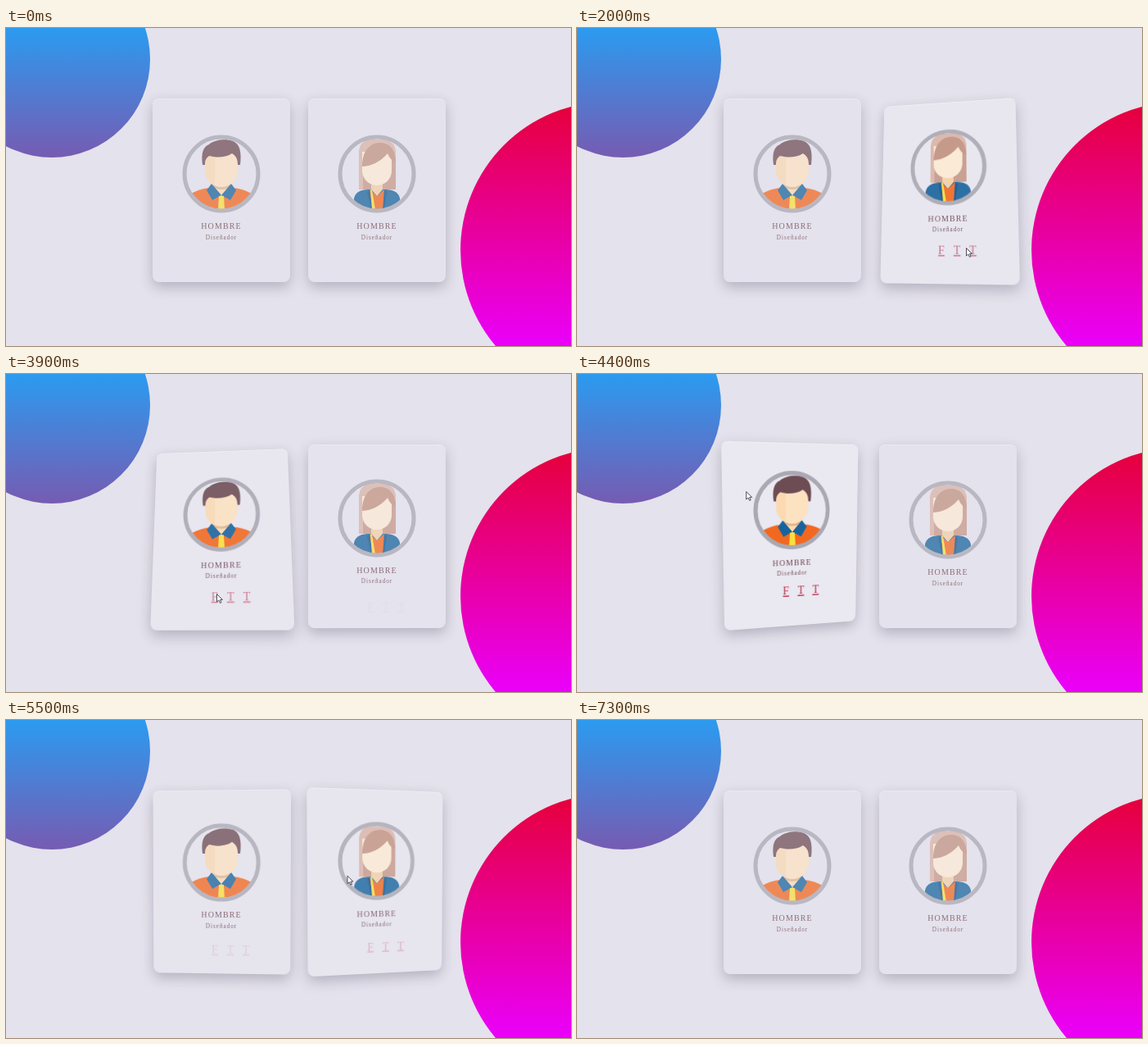
An HTML page that plays this animation: 690 by 388 pixels, repeating every 8.3 s.

```html
<!DOCTYPE html>
<html lang="es">
<head>
<meta charset="utf-8">
<title>Tarjetas</title>
<style>
html, body { margin: 0; width: 100%; height: 100%; overflow: hidden; background: #e4e2ec; }
#stage { position: absolute; left: 0; top: 0; width: 690px; height: 388px; overflow: hidden; background: #e4e2ec; }
.ball { position: absolute; border-radius: 50%; }
.blue { left: -64px; top: -82px; width: 240px; height: 240px; background: linear-gradient(#2b9bf0 82px, #765bb2 240px); }
.pink { left: 555px; top: 90px; width: 362px; height: 362px; background: linear-gradient(#e6003c 6px, #ea00fa 298px); }
.card { position: absolute; top: 86px; width: 168px; height: 224px; border-radius: 8px; background: #e4e2ec;
  box-shadow: 0 6px 16px rgba(55, 50, 75, .28), inset 0 1px 0 rgba(255, 255, 255, .25); }
.card svg, .glare { position: absolute; left: 0; top: 0; width: 168px; height: 224px; }
.card svg { overflow: visible; }
.glare { border-radius: 8px; background: #fff; }
text { font-family: "Liberation Serif", "Times New Roman", serif; text-anchor: middle; }
.name { font-size: 10px; letter-spacing: 1.1px; fill: #6a4450; }
.job { font-size: 7.2px; letter-spacing: 1px; fill: #6a4450; }
.links text { font-size: 14px; fill: #b92b4e; text-decoration: underline; }
#cursor { position: absolute; left: 0; top: 0; width: 10px; height: 14px; overflow: visible; }
</style>
</head>
<body>
<div id="stage">
  <div class="ball blue"></div>
  <div class="ball pink"></div>
</div>
<script>
const LOOP = 8300, STEP = 100;
const CARD = { w: 168, h: 224, top: 86 };
const MAX_TILT = 25, TILT_LAG = 350, HOVER_LAG = 500;
const stage = document.getElementById('stage');

const man = `
  <path d="M-44 44L-37 24Q-26 18-14 17H14Q26 18 37 24L44 44Z" fill="#f2681f"/>
  <path d="M-11 8H11V15L0 28L-11 15Z" fill="#e3b68c"/>
  <path d="M-11 17Q0 21 11 17L0 28Z" fill="#fbdcb4"/>
  <path d="M-12 12L-18 20L-11 32L0 26Z M12 12L18 20L11 32L0 26Z" fill="#17639d"/>
  <path d="M-3 27H3L4 44H-4Z" fill="#fbe03c"/>
  <path d="M-20-27H20V-4C20 8 10 16 0 16C-10 16-20 8-20-4Z" fill="#fde2c2"/>
  <path d="M-20-27H-8V14C-15 11-20 5-20-4Z" fill="#fbdab2"/>
  <path d="M-23-11C-25-26-22-33-15-36C-8-42 6-43 14-40C22-37 25-28 23-11H20C20-18 18-22 13-25C4-19-8-20-15-22C-19-19-20-16-20-11Z" fill="#6d4c54"/>`;

const woman = `
  <path d="M-22 19V-28Q-21-38-12-42H12Q22-38 23-28V19Z" fill="#dab4a8"/>
  <path d="M-17 19V-20H23V19Z" fill="#c79889"/>
  <path d="M-28 44V30Q-26 20-12 19H12Q26 20 28 30V44Z" fill="#17639d"/>
  <path d="M-9 19L0 27L9 19L8 44H-6Z" fill="#f2681f"/>
  <path d="M-7 8H7V19L0 27L-7 19Z" fill="#f3d0a6"/>
  <path d="M-9 19L-12 22L-7 44H-5Z M9 19L12 22L9 44H7Z" fill="#0c528b"/>
  <path d="M-8 19L-6 20L-2 44H-6Z" fill="#fbe03c"/>
  <path d="M-18-27H18V-4C18 7 9 14 0 14C-9 14-18 7-18-4Z" fill="#fdebd4"/>
  <path d="M-18-9C-18-28-9-38 4-38C16-38 23-29 23-14Q16-17 13-25Q0-10-18-9Z" fill="#c2927f"/>`;

function addCard(x, face) {
  const el = document.createElement('div');
  el.className = 'card';
  el.style.left = x + 'px';
  const links = ['F', 'T', 'T'].map((c, i) => `<text x="${76 + 19 * i}" y="184.5">${c}</text>`).join('');
  el.innerHTML = `<div class="glare"></div>
    <svg viewBox="0 0 168 224">
      <clipPath id="round${x}"><circle r="43"/></clipPath>
      <g class="info">
        <g transform="translate(84 92)">
          <g clip-path="url(#round${x})">${face}</g>
          <circle r="45" fill="none" stroke="#a9a8b3" stroke-width="5"/>
        </g>
        <text class="name" x="84" y="159.3">HOMBRE</text>
        <text class="job" x="84" y="171.5">Diseñador</text>
      </g>
      <g class="links">${links}</g>
    </svg>`;
  stage.append(el);
  const [info, linkRow, glare] = ['.info', '.links', '.glare'].map(s => el.querySelector(s).style);
  return { x, el, info, linkRow, glare };
}

const cards = [addCard(179, man), addCard(369, woman)];

stage.insertAdjacentHTML('beforeend', `<svg id="cursor" viewBox="0 0 10 14">
  <path d="M.5.5V10L2.8 8L4.4 11.4L6 10.7L4.5 7.4H7.4Z" fill="#fff" stroke="#3c3a44" stroke-width=".9"/></svg>`);
const cursor = document.getElementById('cursor');

// Stops of the pointer: time, x, y.
const stops = [
  [1350, 640, -40], [2000, 475, 268], [2650, 400, 180], [3300, 482, 210], [3900, 257, 268],
  [4450, 205, 140], [5000, 281, 148], [5700, 450, 200], [6150, 340, 345]
];

function pointer(t) {
  const i = stops.findIndex(s => s[0] > t);
  if (i < 1) return null;
  const [a, b] = [stops[i - 1], stops[i]];
  const u = (t - a[0]) / (b[0] - a[0]), s = u * u * (3 - 2 * u);
  return { x: a[1] + (b[1] - a[1]) * s, y: a[2] + (b[2] - a[2]) * s };
}

// Pointer place on a card from -1 to 1, with on = 1 while it is over the card.
function over(card, t) {
  const p = pointer(t);
  if (p) {
    const x = (p.x - card.x) / CARD.w * 2 - 1, y = (p.y - CARD.top) / CARD.h * 2 - 1;
    if (Math.abs(x) <= 1 && Math.abs(y) <= 1) return { x, y, on: 1 };
  }
  return { x: 0, y: 0, on: 0 };
}

// Weighted mean of the recent past: follows with an ease-out.
function lagged(card, key, t, span, n = 24) {
  let sum = 0, total = 0;
  for (let i = 0; i < n; i++) {
    const w = 1 - (i + .5) / n;
    sum += w * over(card, t - span * (i + .5) / n)[key];
    total += w;
  }
  return sum / total;
}

function pose(card, t) {
  const rx = MAX_TILT * lagged(card, 'y', t, TILT_LAG);
  const ry = -MAX_TILT * lagged(card, 'x', t, TILT_LAG);
  const p = lagged(card, 'on', t, HOVER_LAG);
  card.el.style.transform = `perspective(520px) rotateX(${rx}deg) rotateY(${ry}deg)`;
  card.info.opacity = .72 + .28 * p * p;
  card.info.transform = `translateY(${-11.5 * p}px)`;
  card.linkRow.opacity = p * p;
  card.linkRow.transform = `translateY(${22 * (1 - p)}px)`;
  card.glare.opacity = .2 * p;
}

const start = performance.now();
function draw() {
  const t = Math.floor(((performance.now() - start) % LOOP) / STEP) * STEP;
  const p = pointer(t);
  cursor.style.visibility = p ? 'visible' : 'hidden';
  if (p) cursor.style.transform = `translate(${p.x}px, ${p.y}px)`;
  for (const card of cards) pose(card, t);
  requestAnimationFrame(draw);
}
draw();
</script>
</body>
</html>
```
